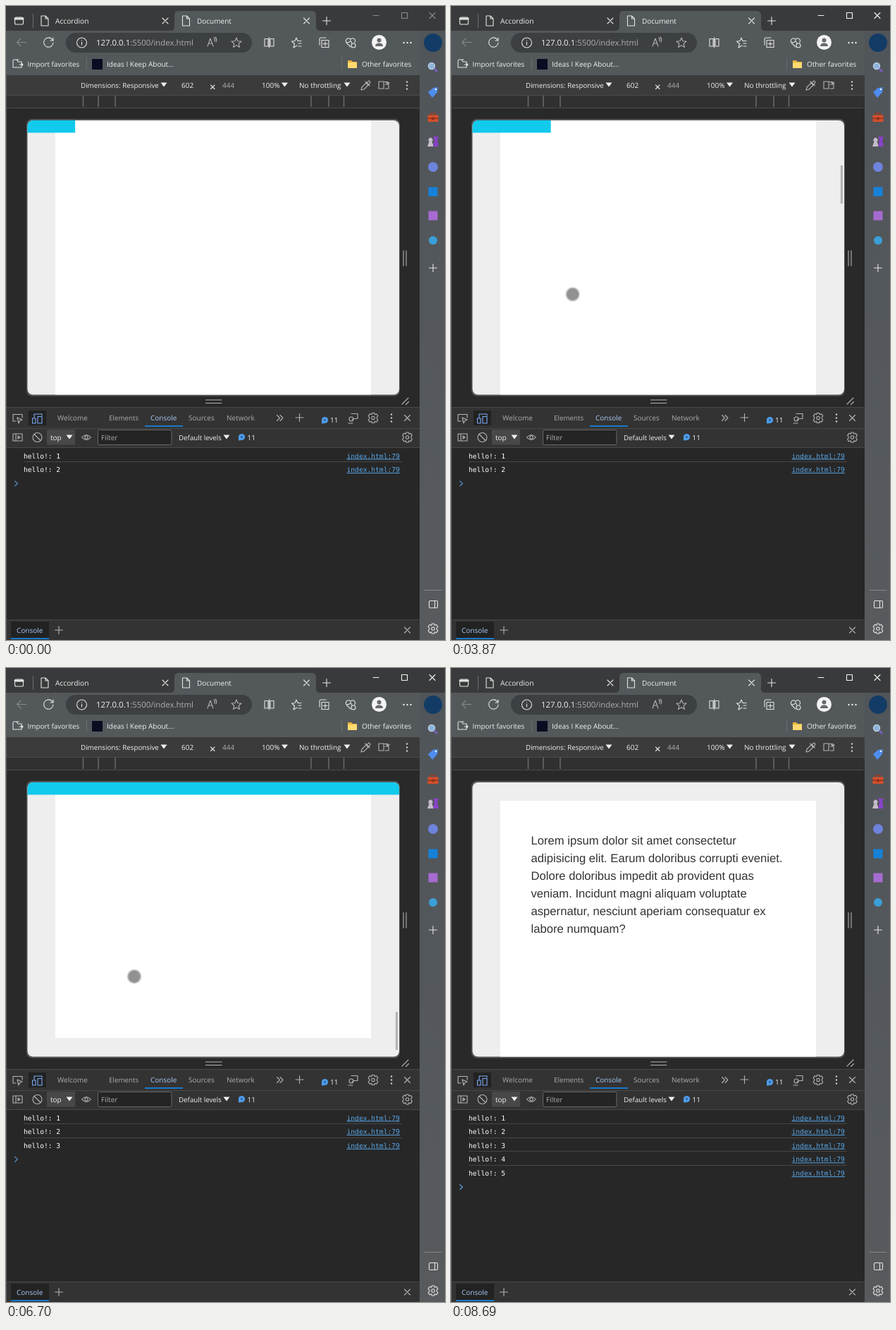
Recreate the animation shown at these times as an HTML page. Size 623 px wide and 898 px high, loop 9180 ms.

```html
<!DOCTYPE html>
<html lang="en">
<head>
<meta charset="utf-8">
<title>Scroll progress</title>
<style>
html, body { margin: 0; width: 100%; height: 100%; overflow: hidden; background: #292929; }
svg { display: block; }
text { font: 10px "Open Sans", "Noto Sans", sans-serif; fill: #f0f0f0; white-space: pre; text-rendering: geometricPrecision; }
.dim text, text.dim, .dim { fill: #adadad; }
.line { fill: none; stroke: #e4e4e4; stroke-width: 1.1; stroke-linecap: round; stroke-linejoin: round; }
.soft { stroke: #b4b4b4; }
.blue { stroke: #7cacf8; }
#lorem text { font: 16.65px "Liberation Sans", Arial, sans-serif; fill: #333; }
#log text { font: 9.65px "DejaVu Sans Mono", monospace; fill: #fff; }
#log .link { fill: #58a6e8; text-decoration: underline; }
</style>
</head>
<body>
<svg width="623" height="898" viewBox="0 0 623 898">
<defs>
  <clipPath id="screen"><rect x="30.5" y="162" width="527.5" height="388.5" rx="8"/></clipPath>
  <linearGradient id="side" x2="0" y2="1"><stop stop-color="#505559"/><stop offset="1" stop-color="#585b5e"/></linearGradient>
  <path id="cross" d="M-4-4 4 4M4-4-4 4"/>
  <path id="plus" d="M-5.5 0H5.5M0-5.5V5.5"/>
  <path id="arrow" d="M-4.5-3H4.5L0 3z" fill="#f0f0f0"/>
  <path id="star" d="M0-7 2-2.3 7-2 3.2 1.4 4.4 6.4 0 3.7-4.4 6.4-3.2 1.4-7-2-2-2.3z"/>
  <path id="page" d="M-5-7H1L5-3V7H-5zM1-7V-3H5"/>
  <g id="gear"><path d="M-1.6-7H1.6L2.2-4.8 4.6-5.8 6.8-2.8 5.4-1V1L6.8 2.8 4.6 5.8 2.2 4.8 1.6 7H-1.6L-2.2 4.8-4.6 5.8-6.8 2.8-5.4 1V-1L-6.8-2.8-4.6-5.8-2.2-4.8z"/><circle r="2.2"/></g>
  <g id="dots"><circle cx="-5" r="1.2"/><circle r="1.2"/><circle cx="5" r="1.2"/></g>
  <g id="bubble"><circle r="4.6" fill="#4d9be8"/><path d="M-4.5 5V0L0 4.5z" fill="#4d9be8"/><circle r="1.4" fill="#2d5f9c"/></g>
</defs>

<!-- Tab strip, address bar and favorites -->
<path fill="#393a3b" d="M0 0H623V36H0z"/>
<path fill="#53585b" d="M0 35H623V98H0zM233 35Q239 35 239 29V13Q239 7 245 7H434Q440 7 440 13V29Q440 35 446 35z"/>
<rect x="85" y="38" width="264" height="28" rx="14" fill="#3c4043"/>
<path stroke="#6a6d70" d="M38.500 11V31M114.500 73V91M476.500 73V91"/>
<g class="line">
  <rect x="12.500" y="16" width="12" height="10" rx="2"/><path d="M13 18H24" stroke-width="3"/>
  <use href="#page" x="55" y="21"/><use href="#page" x="255.500" y="21"/>
  <use href="#cross" x="226" y="21"/><use href="#cross" x="426.500" y="21"/><use href="#plus" x="455" y="21"/>
  <path d="M66 48A6.700 6.700 0 1 0 67 52M67 45V49H63"/>
  <circle cx="107.500" cy="52" r="7"/><path d="M107.500 51V55M107.500 48.500V48.600"/>
  <path d="M367 46.500H372V57H367zM375 46.500H380V57H375zM373.500 44.500V59"/>
  <path d="M413 56 408 59 409.500 53.500 405.500 50 410 49.500 412 45 414 49.500H419M415 53H419M415 57H419"/>
  <path d="M445 55V47Q445 45 447 45H454M448 48.500H458V58.500H448zM453 50.500V56.500M450 53.500H456"/>
  <path d="M489 58 483.500 52.500C480 48 486 43 489 47.500C492 43 498 48 494.500 52M484 51.500H487L489 49 491 53"/><circle cx="493" cy="56" r="3"/>
  <path d="M18 76H11Q10 76 10 78V87H22V79H17L15 76M19 83H24M22 81 24 83 22 85"/>
</g>
<g class="line soft">
  <path stroke="#85888a" d="M15.500 51.500H29M21 46 15.500 51.500 21 57"/>
  <path d="M286 57 290 46 294 57M288 53H292M295 45Q297 47 296 50M297 44Q300 47 298 51"/>
  <use href="#star" x="327" y="52"/>
</g>
<g id="controls" class="line"><path d="M521 13.500H529M561.500 9.500H569.500V17.500H561.500z"/><use href="#cross" x="605" y="13.500"/></g>
<circle cx="529.500" cy="51.500" r="10.500" fill="#f4f4f4"/>
<path fill="#686b6d" d="M524 57Q524 52.500 529.500 52.500T535 57zM526.500 48.500A3 3 0 1 1 532.500 48.500A3 3 0 1 1 526.500 48.500"/>
<use href="#dots" x="569.500" y="52" fill="#eee"/>
<rect x="122" y="75" width="15" height="15" fill="#0b0b22"/>
<path fill="#e9b53c" d="M485 77H490L492 79H498V88H485z"/><path fill="#ffda70" d="M485 80H498V88H485z"/>
<text x="70" y="24.500" style="font-size:10.200px">Accordion</text><text x="271" y="24.500">Document</text>
<text x="128" y="56" style="font-size:11.400px">127.0.0.1<tspan class="dim">:5500/index.html</tspan></text>
<text x="30.500" y="86" style="font-size:9.850px">Import favorites</text>
<text x="143" y="86">Ideas I Keep About...</text><text x="505" y="86">Other favorites</text>

<!-- Device toolbar and ruler -->
<path fill="#3b3b3b" d="M0 98H587V126H0z"/><path fill="#303030" d="M0 127H587V144H0z"/>
<path stroke="#4b4b4b" d="M0 126.500H587M0 144.500H587"/>
<path stroke="#696969" stroke-width="1.500" d="M109.500 127V143M131 127V143M155 127V143M433 127V143M458 127V143M479.500 127V143"/>
<text x="106" y="116" style="font-size:9.800px">Dimensions: Responsive</text><text x="249" y="116">602</text>
<text x="307" y="116" class="dim">444</text><text x="363" y="116">100%</text><text x="416" y="116">No throttling</text>
<use href="#arrow" x="224" y="111.500"/><use href="#arrow" x="395.500" y="111.500"/><use href="#arrow" x="484" y="111.500"/>
<path class="line" d="M290.500 112 296 117.500M296 112 290.500 117.500"/>
<g class="line soft">
  <path d="M504 119 505 115 511 109 514 112 508 118zM510 107 516 113M512 109 515 106Q518 107 516 110L514 112"/>
  <path d="M529 107H536V117H529zM538 111H543V117H538M536 107.500H542V110M540 108.500 542 110.500 544 108.500"/>
</g>
<use href="#dots" transform="translate(569 112.500) rotate(90)" fill="#ccc"/>

<!-- Emulated page -->
<rect x="29" y="160" width="530" height="392.500" rx="8" fill="#535856"/>
<g clip-path="url(#screen)">
  <path fill="#eee" d="M30 162H558V551H30z"/>
  <g id="content"><rect x="70" y="188" width="448" height="2651" fill="#fff"/><g id="lorem"></g></g>
  <rect id="bar" x="30" y="162" height="17.500" fill="#11caec"/>
  <rect id="thumb" x="552.800" width="3.200" height="54" fill="#b5b5b5"/>
  <circle id="touch" r="9.300" fill="#919191" stroke="#c4c4c4" stroke-width="1.800"/>
</g>
<path class="line soft" d="M564 346.500V368M568 346.500V368M283.500 558H306M283.500 562.500H306"/>
<path class="line soft" stroke-width="1.800" d="M562 564 571 555M567.500 564.500 571.500 560.500"/>

<!-- Developer tools -->
<path fill="#333" d="M0 569H587V625H0zM0 870H587V898H0z"/><path fill="#272727" d="M0 626H587V869H0z"/>
<path stroke="#484848" d="M0 568.500H587M0 598.500H587M0 625.500H587M0 869.500H587"/>
<path fill="#222" d="M32 573H57V594H32zM7 872H61V896H7z"/>
<path fill="#484848" d="M58 600H98V621.500H58z"/>
<rect x="130.500" y="600.500" width="104.500" height="21" rx="2" fill="#242424" stroke="#686868"/>
<path stroke="#1979c9" stroke-width="2" d="M197 595H251M7 896H61"/>
<g class="dim"><text x="73" y="587">Welcome</text><text x="146" y="587" style="font-size:9.800px">Elements</text><text x="259" y="587">Sources</text><text x="313" y="587">Network</text><text x="135" y="615">Filter</text></g>
<text x="205" y="587" style="fill:#a8c9f7">Console</text><text x="15" y="888" style="fill:#a8c9f7">Console</text>
<text x="460" y="590">11</text><text x="342.500" y="614.500">11</text>
<text x="63" y="615">top</text><text x="245" y="615" style="font-size:9.750px">Default levels</text>
<use href="#arrow" x="90" y="610.500"/><use href="#arrow" x="313" y="610.500"/>
<use href="#bubble" x="452.500" y="586.500"/><use href="#bubble" x="334.500" y="610.500"/>
<g class="line soft">
  <path d="M14 588H10V578.500H23V583M16 583 23 586 19.500 587.500 18 591z"/>
  <path d="M384.500 579.500 388.500 583.500 384.500 587.500M389 579.500 393 583.500 389 587.500"/>
  <use href="#plus" x="416.500" y="583"/><use href="#plus" x="75" y="884"/>
  <path d="M490 577.500H499V584.500H494L491 586M490 582A3 3 0 1 1 490 588A3 3 0 1 1 490 582M486 591H492"/>
  <use href="#gear" x="521" y="583.500"/><use href="#gear" x="569.500" y="611"/>
  <use href="#cross" x="569.500" y="583.500"/><use href="#cross" x="569.500" y="884"/>
  <path d="M10 606H23V616H10zM14 606V616M17 609 20 611 17 613z"/>
  <circle cx="44.500" cy="611" r="6.500"/><path d="M40 606.500 49 615.500"/>
  <path d="M107.500 611Q114 604 120.500 611Q114 618 107.500 611"/><circle cx="114" cy="611" r="2.200"/>
</g>
<path class="line blue" d="M40 583V578H51V580M45 581.500H51V591H45zM37.500 584H42V591H37.500z"/>
<use href="#dots" transform="translate(547 583.500) rotate(90)" fill="#ccc"/>
<g id="log"></g>
<path id="prompt" class="line" style="stroke:#5e9fe0" stroke-width="1.400" d="M12.500-3.500 16.500 0 12.500 3.500"/>

<!-- Sidebar -->
<path fill="url(#side)" d="M587 35H623V898H587z"/>
<path stroke="#5b5d5f" d="M.5 36V898"/>
<circle cx="606" cy="52" r="13" fill="#123c66"/>
<circle cx="604" cy="85" r="4.500" fill="#8db4da" stroke="#b9cde3" stroke-width="1.500"/><path stroke="#7b62c8" stroke-width="2.500" d="M607.500 88.500 612 93"/>
<path fill="#4e8df0" d="M599 122 606 116 613 115 612 122 605 130z"/><circle cx="610" cy="118" r="1.200" fill="#fff"/>
<path fill="none" stroke="#a33a22" stroke-width="1.500" d="M603 155V152H609V155"/><path fill="#d4502c" d="M598.500 154.500H613.500V164H598.500z"/><path fill="#8c2e1c" d="M598.500 158.500H613.500V160H598.500zM604.500 157.500H607.500V161.500H604.500z"/>
<path fill="#c4bcc8" d="M598 199 600.500 192A3 3 0 1 1 604.500 192L607 199z"/><path fill="#8842c8" d="M606 199 608 190 606 185H614L612 190 614 199z"/>
<circle cx="606" cy="228" r="7" fill="#6d83dc"/>
<rect x="599.500" y="256.500" width="13" height="13" fill="#1681d8"/>
<rect x="599.500" y="290.500" width="13" height="13" fill="#a66bd0"/>
<circle cx="606" cy="332" r="6" fill="#3b9fd8"/>
<g class="line">
  <use href="#plus" x="606" y="371"/><rect x="600.500" y="842.500" width="12" height="10" rx="1.500"/><path d="M608.500 843V852"/>
  <use href="#gear" x="606" y="882"/><path stroke="#85888a" d="M594 827.500H618"/>
</g>
</svg>
<script>
const LOOP = 9180, STEP = 79.2;
const $ = id => document.getElementById(id);
const set = (id, attrs) => { for (const k in attrs) $(id).setAttribute(k, attrs[k]); };

// Smooth curve through [time, value] points that never overshoots them.
function curve(points) {
  const slope = i => (points[i + 1][1] - points[i][1]) / (points[i + 1][0] - points[i][0]);
  const tangent = i => {
    if (i < 1 || i > points.length - 2) return 0;
    const a = slope(i - 1), b = slope(i);
    return a * b > 0 ? 2 * a * b / (a + b) : 0;
  };
  return t => {
    const last = points.length - 1;
    if (t <= points[0][0]) return points[0][1];
    if (t >= points[last][0]) return points[last][1];
    const i = points.findIndex(p => p[0] > t) - 1;
    const [t0, a] = points[i], [t1, b] = points[i + 1];
    const h = t1 - t0, u = (t - t0) / h, v = 1 - u;
    return a * v * v * (1 + 2 * u) + b * u * u * (1 + 2 * v) + h * u * v * (v * tangent(i) - u * tangent(i + 1));
  };
}

const scroll = curve([[1590, .129], [2050, .22], [2530, .355], [2930, .5], [3260, .56], [3400, .55],
  [3800, .22], [4340, 0], [4600, 0], [5280, .212], [5520, .285], [6000, .65], [6460, .985], [6600, 1],
  [6840, 1], [7250, .55], [7590, .23], [8130, 0]]);
const path = [[990, 32, 421], [1080, 85, 411], [1160, 140, 406], [1240, 172, 408], [3560, 172, 408],
  [4340, 174, 409], [4660, 174, 409], [5280, 176, 410], [5520, 177, 415], [6710, 182, 437], [7590, 191, 449]];
const touchX = curve(path.map(p => [p[0], p[1]]));
const touchY = curve(path.map(p => [p[0], p[2]]));

$("lorem").innerHTML = ["Lorem ipsum dolor sit amet consectetur", "adipisicing elit. Earum doloribus corrupti eveniet.",
  "Dolore doloribus impedit ab provident quas", "veniam. Incidunt magni aliquam voluptate",
  "aspernatur, nesciunt aperiam consequatur ex", "labore numquam?"]
  .map((s, i) => `<text x="113.5" y="${249.5 + 25 * i}">${s}</text>`).join("");

$("log").innerHTML = [0, 1, 2, 3, 4].map(i => {
  const y = 640.5 + 19.65 * i;
  const rule = i ? `<path stroke="#474747" d="M25 ${Math.round(y - 14) - .5}H562"/>` : "";
  return `<g>${rule}<text x="25" y="${y}">hello!: ${i + 1}</text><text x="483.5" y="${y}" class="link">index.html:79</text></g>`;
}).join("");
const rows = [...$("log").children];

function thumbOpacity(t) {
  if (t < 1620) return 0;
  if (t >= 4500 && t < 4640) return .9;
  return t < 8290 ? 1 : Math.max(.1, 1 - (t - 8290) / 440);
}

function draw(t) {
  const held = 35 + (Math.floor((t - 35) / STEP) + .3) * STEP;
  const s = scroll(held);
  const count = 2 + [4500, 6780, 8290].filter(at => t >= at).length;
  set("content", { transform: `translate(0 ${-2315 * s})` });
  set("bar", { width: 528 * scroll(held - 45) });
  set("thumb", { y: 166 + 321 * s, opacity: thumbOpacity(t) });
  set("touch", { cx: touchX(held), cy: touchY(held), opacity: t >= 990 && t < 8370 ? 1 : 0 });
  set("controls", { style: `stroke:${t < 90 ? "#8c8c8c" : "#f4f4f4"}` });
  set("prompt", { transform: `translate(0 ${637 + 19.65 * count})` });
  rows.forEach((row, i) => row.setAttribute("visibility", i < count ? "visible" : "hidden"));
}

const start = performance.now();
function tick() {
  draw((performance.now() - start) % LOOP);
  requestAnimationFrame(tick);
}
tick();
</script>
</body>
</html>
```
